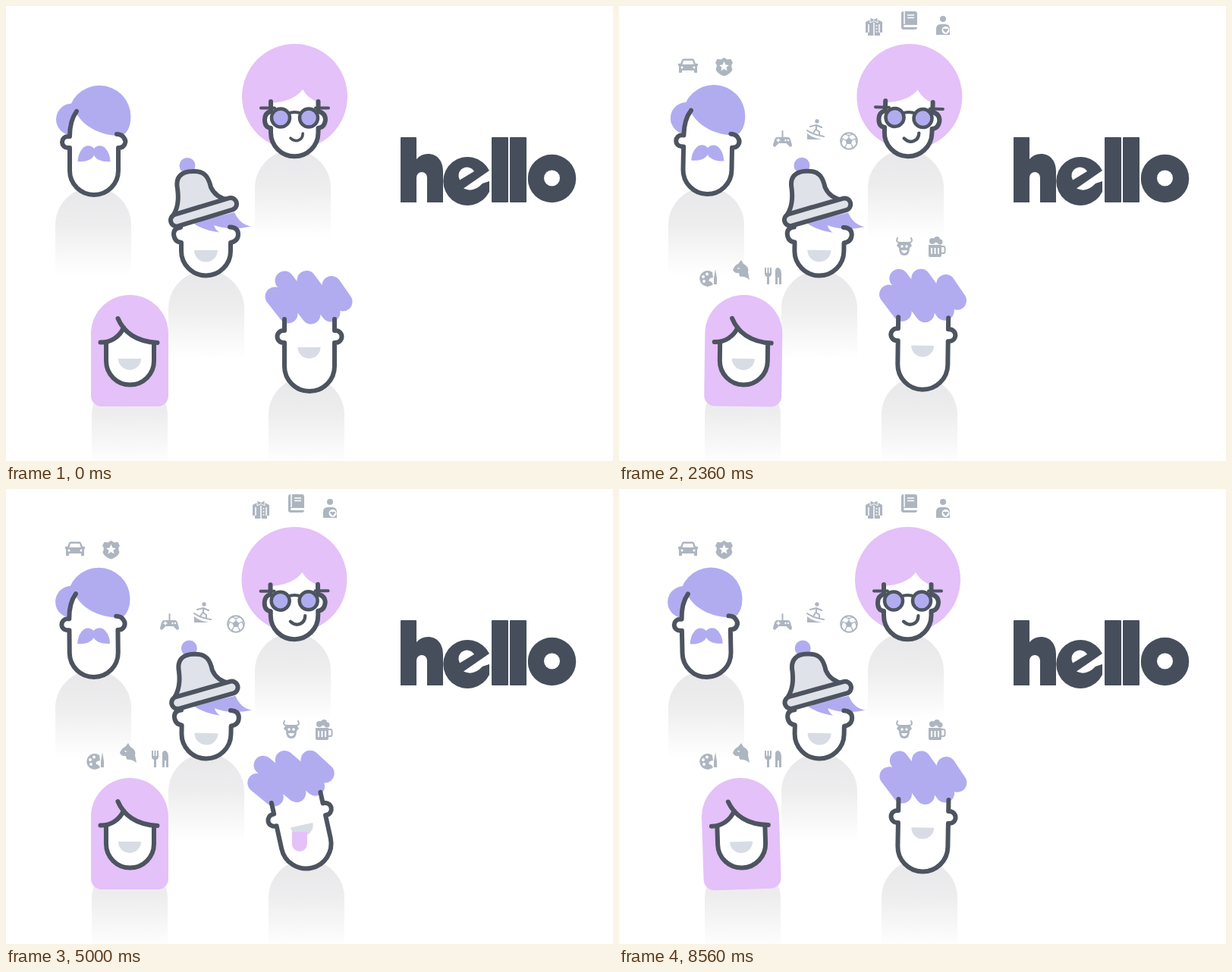
These frames come from a looping animation (800 px wide and 600 px high, 8600 ms). An HTML page:

```html
<!DOCTYPE html>
<html lang="en">
<head>
<meta charset="utf-8">
<title>hello</title>
<style>
html, body { margin: 0; width: 100%; height: 100%; overflow: hidden; background: #fff; }
svg { display: block; width: 800px; height: 600px; }
.line { fill: none; stroke: #4d5460; stroke-width: 6; stroke-linecap: round; stroke-linejoin: round; }
.face { fill: #fff; }
.violet { fill: #b1acf0; }
.pink { fill: #e4c1f8; }
.mouth { fill: #d8dce5; }
.word { fill: #464e5c; }
.w { fill: #fff; }
#icons { fill: #adb5c0; }
#icons .s { fill: none; stroke: #adb5c0; stroke-width: 2; stroke-linecap: round; stroke-linejoin: round; }
#icons .ws { fill: none; stroke: #fff; stroke-width: 1.5; }
</style>
</head>
<body>
<svg viewBox="0 0 800 600">
  <defs>
    <linearGradient id="fade" x1="0" y1="0" x2="0" y2="1">
      <stop offset="0" stop-color="#e8e8ea"/>
      <stop offset=".4" stop-color="#ededee"/>
      <stop offset="1" stop-color="#fff"/>
    </linearGradient>
    <path id="torso" d="M0 116V50a50 50 0 0 1 100 0V116z" fill="url(#fade)"/>
  </defs>

  <use href="#torso" x="65" y="239"/>
  <use href="#torso" x="328" y="190"/>
  <use href="#torso" x="214" y="349"/>
  <use href="#torso" x="346" y="489"/>
  <use href="#torso" x="113" y="490"/>

  <g id="icons"></g>

  <g id="man">
    <circle class="violet" cx="87" cy="149.500" r="21"/>
    <path class="face" d="M93 139Q84 151 84 172h-2.500a7.500 7.500 0 0 0 0 15H84v30a32 32 0 0 0 64 0v-30h1.500a8 8 0 0 0 6-13l-5-12z"/>
    <path class="violet" d="M92 140C101 158 124 172 154 171Q164.500 163 164.500 146A41.250 41.250 0 0 0 82 146z"/>
    <path class="line" d="M93 139Q84 151 84 172h-2.500a7.500 7.500 0 0 0 0 15H84v30a32 32 0 0 0 64 0v-30h1.500a8 8 0 0 0 6-13q-3-5-9.500-5"/>
    <path class="violet" d="M116 188C112 183 104 183 100 189Q95 195 94.500 205C104 206 113 203 116 197C119 203 128 206 137.500 205Q137 195 132 189C128 183 120 183 116 188z"/>
  </g>

  <g id="afro">
    <circle class="pink" cx="380.500" cy="119.500" r="69.500"/>
    <path class="face" d="M349 128Q379 126 391 110Q398 122 411.500 127V139Q421 141 421 150Q420 160 411.500 161V167a31.250 31.250 0 0 1-62.500 0V161Q341 160 341 150Q341 141 349 139z"/>
    <path class="line" d="M349 126V139Q341 141 341 150Q341 160 349 161V167a31.250 31.250 0 0 0 62.500 0V161Q420 160 421 150Q421 141 411.500 139V126" stroke-width="5.500"/>
    <path class="line" d="M336 134.500H354M408 134.500H425M371 142Q380.500 138 390 142" style="stroke-width:4"/>
    <g class="violet" stroke="#4d5460" stroke-width="4.500">
      <circle cx="362" cy="147.500" r="12"/>
      <circle cx="399" cy="147.500" r="12"/>
    </g>
    <path id="smile" class="line" d="M375 174.500C383 182 393 177 393 167.500" style="stroke-width:4"/>
  </g>

  <g id="hat">
    <path class="face" d="M230 285V292Q221 293 221 301Q222 311 231 312V323a32.500 32.500 0 0 0 65 0V312Q306 310 306 301Q306 292 296 291V275z"/>
    <path class="violet" d="M246 286Q260 296 281 298.500Q275 294 274 289Q296 297 323 290.500Q308 288 301 272z"/>
    <path class="line" d="M230 292Q221 293 221 301Q222 311 231 312V323a32.500 32.500 0 0 0 65 0V312Q306 310 306 301Q306 292 295 291.500"/>
    <path class="mouth" d="M248 322h31a15.500 15.500 0 0 1-31 0z"/>
    <circle class="violet" cx="239" cy="210.500" r="10.500"/>
    <path class="line" style="fill:#dfe2e9" d="M221 275Q229 262 226 241C223 226 231 218 246 218C262 217 267 226 270 239C274 248 283 254 294 256"/>
    <path class="line" style="stroke-width:22" d="M225 282.500L296 261"/>
    <path class="line" style="stroke-width:10;stroke:#dfe2e9" d="M225 282.500L296 261"/>
  </g>

  <g id="girl">
    <path class="pink" d="M112 432a51 51 0 0 1 102 0V514a14 14 0 0 1-14 14H126a14 14 0 0 1-14-14z"/>
    <path id="skin" class="face"/>
    <path id="jaw" class="line" d="M132 445V468a31.500 31.500 0 0 0 63 0V445"/>
    <path id="fringe" class="line" d="M124.500 443.500C138 444 150 436 155 424M147.500 412C155 430 172 443 199.500 444"/>
    <path id="grin" class="mouth" d="M148 465h30a15 15 0 0 1-30 0z"/>
  </g>

  <g id="punk">
    <path class="face" d="M367 413V428h-1.500a8 8 0 0 0 0 16h1.500V475a33 33 0 0 0 66 0V444h1.500a8 8 0 0 0 0-16H433V413z"/>
    <path d="M354 383L372 406M367 362L402 407M396 361.500L428 404M429 368.500L444 390" stroke="#b1acf0" stroke-width="25" stroke-linecap="round"/>
    <path class="line" d="M367 413V428h-1.500a8 8 0 0 0 0 16h1.500V475a33 33 0 0 0 66 0V444h1.500a8 8 0 0 0 0-16H433V413"/>
    <path class="mouth" d="M384.500 450h30a15 15 0 0 1-30 0z"/>
    <path id="tongue" class="pink" d="M-10 0H10V16a10 10 0 0 1-20 0z"/>
  </g>

  <g class="word" role="img" aria-label="hello">
    <path d="M520 174q0-1 1-1h19q1 0 1 1V202Q547 195 556 195C569 195 576 205 576 218V259H555V226a7 7 0 0 0-14 0V259H520z"/>
    <path d="M637 217A32 32 0 1 0 637 245V231L628 234Q616 247 603 240.500z"/>
    <path class="w" d="M598 229.500A10.500 10.500 0 0 1 617 218z"/>
    <rect x="640" y="173" width="22" height="86" rx="1"/>
    <rect x="664" y="173" width="22" height="86" rx="1"/>
    <circle cx="719.500" cy="227.500" r="31.750"/>
    <circle class="w" cx="719.500" cy="227" r="10.500"/>
  </g>
</svg>

<script>
const LOOP = 8600, STEP = 40, POP = 700;
const el = id => document.getElementById(id);
const move = (id, value) => el(id).setAttribute('transform', value);

// x, y, start time, drawing around 0,0
const icons = [
  [91, 79, 400, `<path d="M-13-3h3l2-5q.5-1.500 2-1.500H6q1.500 0 2 1.500l2 5h3v3h-1V9H8V6H-8V9h-4V0h-1z"/>
    <path class="w" d="M-7.500-2l1.500-5H6l1.500 5z"/><circle class="w" cx="-8" cy="2" r="1.500"/><circle class="w" cx="8" cy="2" r="1.500"/>`],
  [138.5, 80, 480, `<path d="M0-12L4-9.500 9-10 11.500-5Q8-2 11 3 10 9 0 12.500-10 9-11 3-8-2-11.500-5L-9-10-4-9.500z"/>
    <path class="w" d="M0-7L2-2.500 6.500-2 3 1 4 5.500 0 3-4 5.500-3 1-6.500-2-2-2.500z"/>`],
  [336, 27, 560, `<path d="M-11-6L-5-9H5L11-6V8H8V12H-8V8H-11z"/><path class="ws" d="M0-5V12M-7-3V8M7-3V8"/>
    <path d="M-5-12L0-9.500 5-12V-5L0-7.500-5-5z" stroke="#fff"/><path class="ws" d="M2.500-1h2M2.500 3h2M2.500 7h2"/>`],
  [382, 19, 640, `<rect x="-10" y="-12" width="21" height="24" rx="3"/><path class="ws" d="M-6-12V5M-2-7H7M-2-3.500H7"/>
    <path class="w" d="M-6 6H11V9H-6q-2-1.500 0-3z"/>`],
  [427, 26, 720, `<circle cy="-9" r="4"/><path d="M-9 12V4q0-6 6-6h6q6 0 6 6v8z"/><circle class="w" cx="3.500" cy="6" r="5"/>
    <path d="M3.500 9.500L0 5.500q0-3 3.500-1 3.500-2 3.500 1z"/>`],
  [215.5, 176, 480, `<path class="s" d="M0-11V-2"/><path d="M-7-3H7q3 0 4 5l1.500 5q0 3.500-3 2.500L5 5H-5l-4.500 4.500q-3 1-3-2.500l1.500-5q1-5 4-5z"/>
    <path class="ws" d="M-8 1h5M-5.500-1.500v5"/><circle class="w" cx="4" cy="1" r="1.200"/><circle class="w" cx="7.500" cy="1" r="1.200"/>`],
  [259, 164, 560, `<circle cx="2" cy="-12" r="2.700"/><path class="s" d="M-7-5L1-7 8-4M1-7V-1L5 2V6M0-1L-3 4"/>
    <path class="s" d="M-11 0Q-3 6 11 8"/><path d="M-11 12V4Q-4 10 8 12z"/>`],
  [303, 178, 640, `<circle class="s" r="10.800"/><path d="M0-4.500L4.500-1 3 4H-3L-4.500-1z"/>
    <path class="s" style="stroke-width:1.300" d="M0-4V-8M4-1L8-3M3 4L5 8M-3 4L-5 8M-4-1L-8-3M-5-9L0-7 5-9M10 2L8-3M-10 2L-8-3M-4 10L-5 7M4 10L5 7"/>`],
  [118, 358, 580, `<path d="M5-7A10.500 10.500 0 1 0 6 9Q4 5 1 5-1 1 6 0z"/><circle class="w" cx="-7" cy="-1" r="2"/>
    <circle class="w" cx="-2" cy="-4.500" r="2"/><circle class="w" cx="-6" cy="5" r="2"/><path d="M9-11L11 1V9H7V1z"/>`],
  [161, 348, 660, `<path d="M0-13L3-8Q11-4 9 3L11 13Q4 8-1 9-3 7-3 4-9 5-11 0-9-6-4-8z"/><path class="w" d="M-5-3l4 1-3 1z"/>`],
  [203, 356, 740, `<path d="M-11-11h2v7h1.500v-7h2v7H-4v-7h2V-3q0 3-3 4v10h-3V1q-3-1-3-4z"/><path d="M3 11V-7q0-4 4-4 4 2 4 8V11H8V2H6v9z"/>`],
  [376, 318, 640, `<path class="s" d="M-9-12Q-12-6-5-6M9-12Q12-6 5-6"/><path d="M-7-7H7L10-2 7 1Q7 11 0 11-7 11-7 1L-10-2z"/>
    <circle class="w" cx="-3" cy="-1" r="1.800"/><circle class="w" cx="3" cy="-1" r="1.800"/><path class="w" d="M-4 4H4Q3 8 0 8-3 8-4 4z"/>`],
  [418, 318, 720, `<circle cx="-5" cy="-8" r="4"/><circle cx="1" cy="-10" r="4"/><circle cx="5" cy="-7" r="3.500"/>
    <path d="M-10-3H7V11q0 2-2 2H-8q-2 0-2-2z"/><path class="ws" style="stroke-width:2" d="M-6 1V9M-1.500 1V9M3 1V9"/><path class="s" d="M7-1h2.500q2 0 2 2V6q0 2-2 2H7"/>`]
];

// flat lists of time, value
const curves = {
  man: [0, 0, 600, -.6, 1680, -1.6, 2100, -1.2, 2800, 6.5, 3000, 6, 3900, -1.2, 5000, -.6, 6080, 1.3, 6600, 2, 7320, 1.2, 8560, -1.2],
  manY: [0, 0, 800, -1],
  afro: [0, 0, 1680, .2, 2400, 1.8, 3000, 1.5, 5000, -.4, 5800, 1.8, 6080, 1.8, 7000, 0],
  smile: [0, .9, 800, 1.08],
  hat: [0, 0, 1680, .9, 2200, 1, 3000, -1.1, 5000, 1, 6080, -.4, 7000, -1.1, 7320, -1.1, 8560, 1.3],
  girl: [0, 0, 700, .4, 1680, -1, 2300, .8, 3000, .5, 4000, -.4, 5200, 0, 6400, 0, 7320, -.5, 8560, -1.8],
  turn: [5300, 0, 5900, 1, 6300, 1, 6900, 0],
  punk: [0, 0, 600, .4, 1680, -1.5, 2400, .8, 3000, 1.1, 3900, .9, 4400, -12.4, 6940, -12.4, 7320, .3, 8000, 1.2, 8560, 1],
  punkY: [0, 0, 1680, -2, 3000, -2.5, 3900, -2.5, 4400, -8, 6940, -8, 7320, -5.5, 8560, -3.5],
  tongue: [4400, 0, 4700, 1, 6750, 1, 6980, 0]
};

function at(name, t) {
  const k = curves[name];
  if (t <= k[0]) return k[1];
  for (let i = 2; i < k.length; i += 2) {
    if (t < k[i]) {
      const p = (t - k[i - 2]) / (k[i] - k[i - 2]);
      return k[i - 1] + (k[i + 1] - k[i - 1]) * (1 - Math.cos(p * Math.PI)) / 2;
    }
  }
  return k[k.length - 1];
}

function backOut(p) {
  const q = p - 1;
  return 1 + 2.7 * q ** 3 + 1.7 * q ** 2;
}

el('icons').innerHTML = icons.map((icon, i) => `<g id="icon${i}">${icon[3]}</g>`).join('');

function draw(t) {
  icons.forEach(([x, y, start], i) => {
    const p = Math.min(1, Math.max(0, (t - start) / POP));
    const s = p ? backOut(p) : 0;
    move('icon' + i, `translate(${x} ${y + 40 * (1 - s)}) scale(${s})`);
    el('icon' + i).setAttribute('opacity', Math.min(1, p * 4));
  });

  move('man', `translate(0 ${at('manY', t)}) rotate(${at('man', t)} 115 240)`);
  move('afro', `rotate(${at('afro', t)} 380 196)`);
  move('smile', `translate(375 172) scale(${at('smile', t)}) translate(-375 -172)`);
  move('hat', `rotate(${at('hat', t)} 264 350)`);
  move('girl', `rotate(${at('girl', t)} 163 528)`);

  const turn = at('turn', t), f = 6 * turn, s = 11.5 * turn, y = -4 * turn;
  move('jaw', `translate(${f} ${y})`);
  move('skin', `translate(0 ${y})`);
  move('fringe', `translate(${s} ${y})`);
  move('grin', `translate(${14 * turn} ${y})`);
  el('skin').setAttribute('d', `M${132 + f} 443Q${148 + s} 439 ${155 + s} 424Q${168 + s} 440 ${195 + f} 444V468a31.5 31.5 0 0 1-63 0z`);

  move('punk', `translate(0 ${at('punkY', t)}) rotate(${at('punk', t)} 400 496)`);
  move('tongue', `translate(395 458) rotate(12.4) scale(1 ${at('tongue', t)})`);
}

const begin = performance.now();
function tick() {
  const t = (performance.now() - begin) % LOOP;
  draw(Math.floor(t / STEP) * STEP);
  requestAnimationFrame(tick);
}
tick();
</script>
</body>
</html>
```
